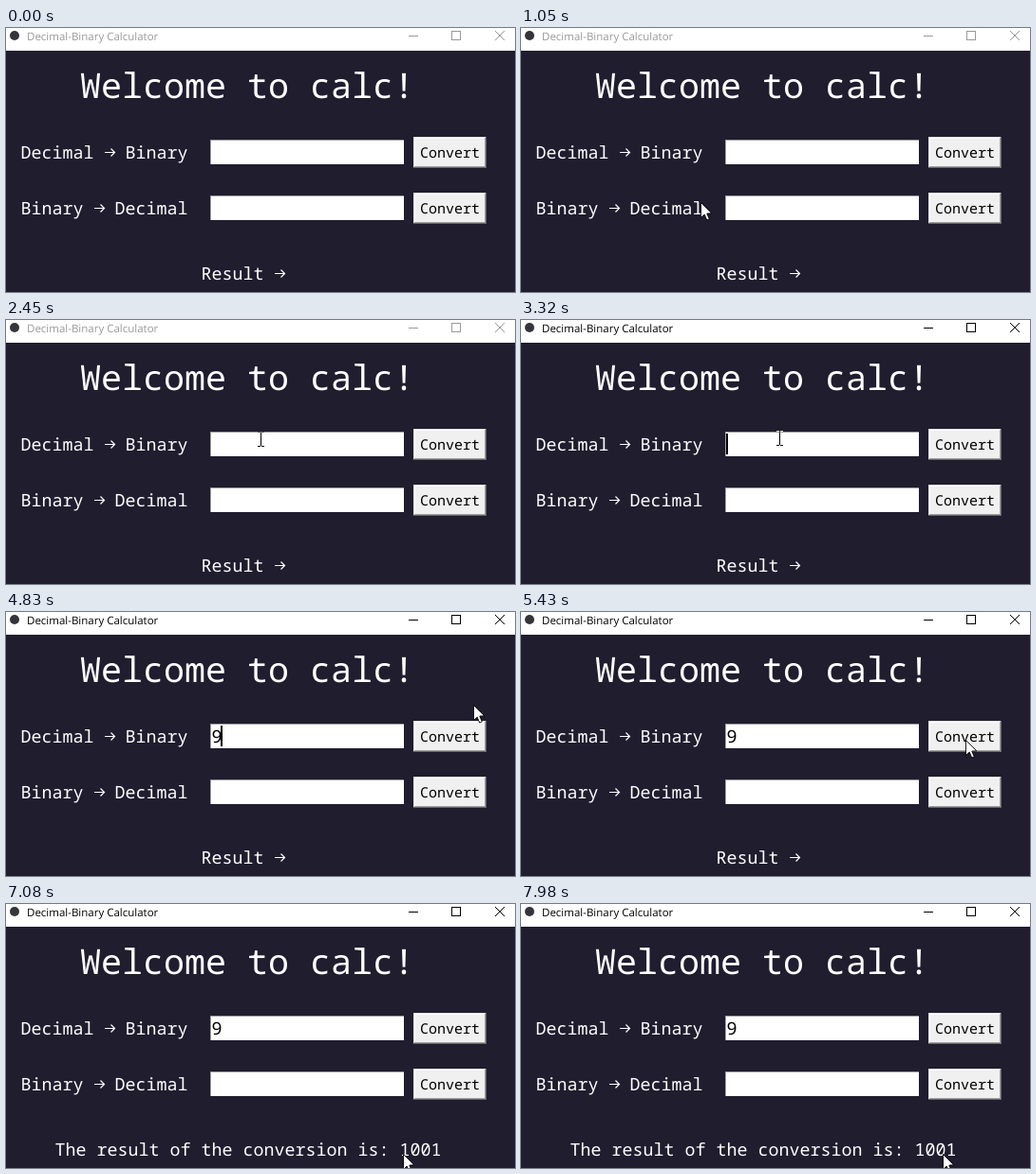
Animation of 536 by 279 pixels, one loop 8000 ms. Source, as an HTML page with a canvas:

```html
<!DOCTYPE html>
<html lang="en">
<head>
<meta charset="utf-8">
<title>Decimal-Binary Calculator</title>
<style>
html, body { margin: 0; width: 100%; height: 100%; overflow: hidden; background: #1f1d2e; }
canvas { display: block; }
</style>
</head>
<body>
<canvas id="stage" width="536" height="279"></canvas>
<script>
const ctx = document.getElementById('stage').getContext('2d');
const LOOP = 8000, FOCUS = 2810, TYPED = 4020, PRESS = 5880, RELEASE = 5930;
const MONO = '"Noto Sans Mono", "DejaVu Sans Mono", monospace';
const SANS = '"Open Sans", "Noto Sans", sans-serif';
const CELL = 11;

// Eased move between two points; sag bends the way downwards
const glide = (x0, y0, x1, y1, sag = 0) => u => {
  const e = 1 - (1 - u) ** 2;
  return [x0 + (x1 - x0) * e, y0 + (y1 - y0) * e + sag * Math.sin(Math.PI * e)];
};

// Clockwise widening loops over the window
const orbit = u => {
  const angle = 2.02 + 9.26 * u, r = 0.77 + 0.25 * u;
  return [231 + 125 * r * Math.cos(angle), 135 + 71 * r * Math.sin(angle)];
};

// Small wiggle next to the result
const sway = u => {
  const s = Math.sin(4 * Math.PI * u);
  return [418 + 26 * u - 12 * s, 264 + 5 * s];
};

const legs = [
  { from: 550, to: 1050, path: glide(489, 270, 190, 184, 20) },
  { from: 1050, to: 1900, path: orbit },
  { from: 1900, to: 2200, path: glide(267, 65, 217, 132) },
  { from: 2200, to: 2550, path: glide(217, 132, 272, 125) },
  { from: 4270, to: 4830, path: glide(272, 125, 492, 98, 20) },
  { from: 4830, to: 5530, path: glide(492, 98, 468, 136) },
  { from: 6295, to: 7130, path: glide(468, 136, 418, 264) },
  { from: 7130, to: 7980, path: sway }
];

// The pointer moves in steps of 50 ms
function pointer(t) {
  const shift = t < FOCUS ? 0 : 30;
  const q = Math.floor((t - shift) / 50) * 50 + shift;
  const leg = legs.filter(l => q >= l.from).pop();
  return leg && leg.path(Math.min(1, (q - leg.from) / (leg.to - leg.from))).map(Math.round);
}

// Blink: 600 ms on, 300 ms off
const caretOn = t => t >= FOCUS && (t - FOCUS + 890) % 900 < 600 || t >= FOCUS && t < FOCUS + 10;

function rect(color, x, y, w, h) {
  ctx.fillStyle = color;
  ctx.fillRect(x, y, w, h);
}

function text(str, x, y, size, color, family = MONO, weight = 400) {
  ctx.font = `${weight} ${size}px ${family}`;
  ctx.fillStyle = color;
  ctx.fillText(str, x, y);
}

function lines(color, width, ...runs) {
  ctx.strokeStyle = color;
  ctx.lineWidth = width;
  ctx.beginPath();
  for (const run of runs)
    run.forEach(([x, y], i) => i ? ctx.lineTo(x, y) : ctx.moveTo(x, y));
  ctx.stroke();
}

const label = (str, x, y) => text(str, x + 0.5, y, 18.333, '#fff', MONO, 500);

function arrowLabel(from, to, x, y) {
  const ax = x + (from.length + 1) * CELL, ay = y - 6.5;
  label(from, x, y);
  lines('#fff', 1.2, [[ax + 1, ay], [ax + 11.5, ay]],
    [[ax + 7.5, ay - 4], [ax + 11.5, ay], [ax + 7.5, ay + 4]]);
  label(to, ax + 2 * CELL, y);
}

function entry(y) {
  rect('#a0a0a0', 215, y, 204, 26);
  rect('#fff', 216, y + 1, 203, 25);
}

// Two-pixel bevel: outer and inner edge on each side
function button(y, pressed) {
  const light = ['#e3e3e3', '#fff'], dark = ['#696969', '#a0a0a0'];
  const [upper, lower] = pressed ? [dark, light] : [light, dark];
  for (const i of [0, 1]) {
    rect(lower[i], 429 + i, y + i, 77 - 2 * i, 33 - 2 * i);
    rect(upper[i], 429 + i, y + i, 76 - 2 * i, 32 - 2 * i);
  }
  rect('#f0f0f0', 431, y + 2, 73, 29);
  const d = pressed ? 1 : 0;
  text('Convert', 436 + d, y + 22 + d, 15, '#000');
}

function titleBar(ink) {
  rect('#fff', 0, 0, 536, 24);
  ctx.fillStyle = '#33353a';
  ctx.beginPath();
  ctx.arc(9, 8, 5, 0, 7);
  ctx.fill();
  text('Decimal-Binary Calculator', 22, 13, 11.5, ink, SANS);
  lines(ink, 1, [[424, 8.5], [434, 8.5]], [[515, 3], [525, 13]], [[525, 3], [515, 13]]);
  ctx.strokeRect(469.5, 3.5, 9, 9);
}

// The text cursor inverts what lies below it
function drawBeam(x, y) {
  ctx.globalCompositeOperation = 'difference';
  rect('#fff', x, y - 7, 1, 14);
  for (const row of [y - 8, y + 7])
    for (const left of [x - 3, x + 1]) rect('#fff', left, row, 3, 1);
  ctx.globalCompositeOperation = 'source-over';
}

function drawArrow(x, y) {
  ctx.save();
  ctx.translate(x + 0.5, y + 0.5);
  ctx.beginPath();
  for (const [px, py] of [[0, 0], [0, 16], [3.7, 12.6], [6.2, 18.5], [8.8, 17.4], [6.3, 11.6], [11.3, 11.3]])
    ctx.lineTo(px, py);
  ctx.closePath();
  ctx.fillStyle = '#fff';
  ctx.fill();
  ctx.strokeStyle = '#000';
  ctx.lineWidth = 0.9;
  ctx.stroke();
  ctx.restore();
}

function drawPointer(x, y) {
  const inEntry = x >= 215 && x < 419 && [118, 177].some(top => y >= top && y < top + 26);
  (inEntry ? drawBeam : drawArrow)(x, y);
}

function draw(t) {
  const typed = t >= TYPED;
  rect('#1f1d2e', 0, 0, 536, 279);
  titleBar(t < FOCUS ? '#999' : '#000');
  text('Welcome to calc!', 78, 74, 36.667, '#fff');
  arrowLabel('Decimal', 'Binary', 15, 138);
  arrowLabel('Binary', 'Decimal', 15, 197);
  entry(118);
  entry(177);
  button(115, t >= PRESS && t < RELEASE);
  button(174, false);
  if (typed) text('9', 216.5, 138, 18.333, '#000', MONO, 500);
  if (caretOn(t)) rect('#000', typed ? 226 : 216, 120, 2, 22);
  if (t < RELEASE) arrowLabel('Result', '', 205, 266);
  else label('The result of the conversion is: 1001', 51, 266);
  const p = pointer(t);
  if (p) drawPointer(...p);
}

ctx.textRendering = 'geometricPrecision';
const start = performance.now();
function tick(now) {
  draw(Math.max(0, now - start) % LOOP);
  requestAnimationFrame(tick);
}
draw(0);
requestAnimationFrame(tick);
</script>
</body>
</html>
```
